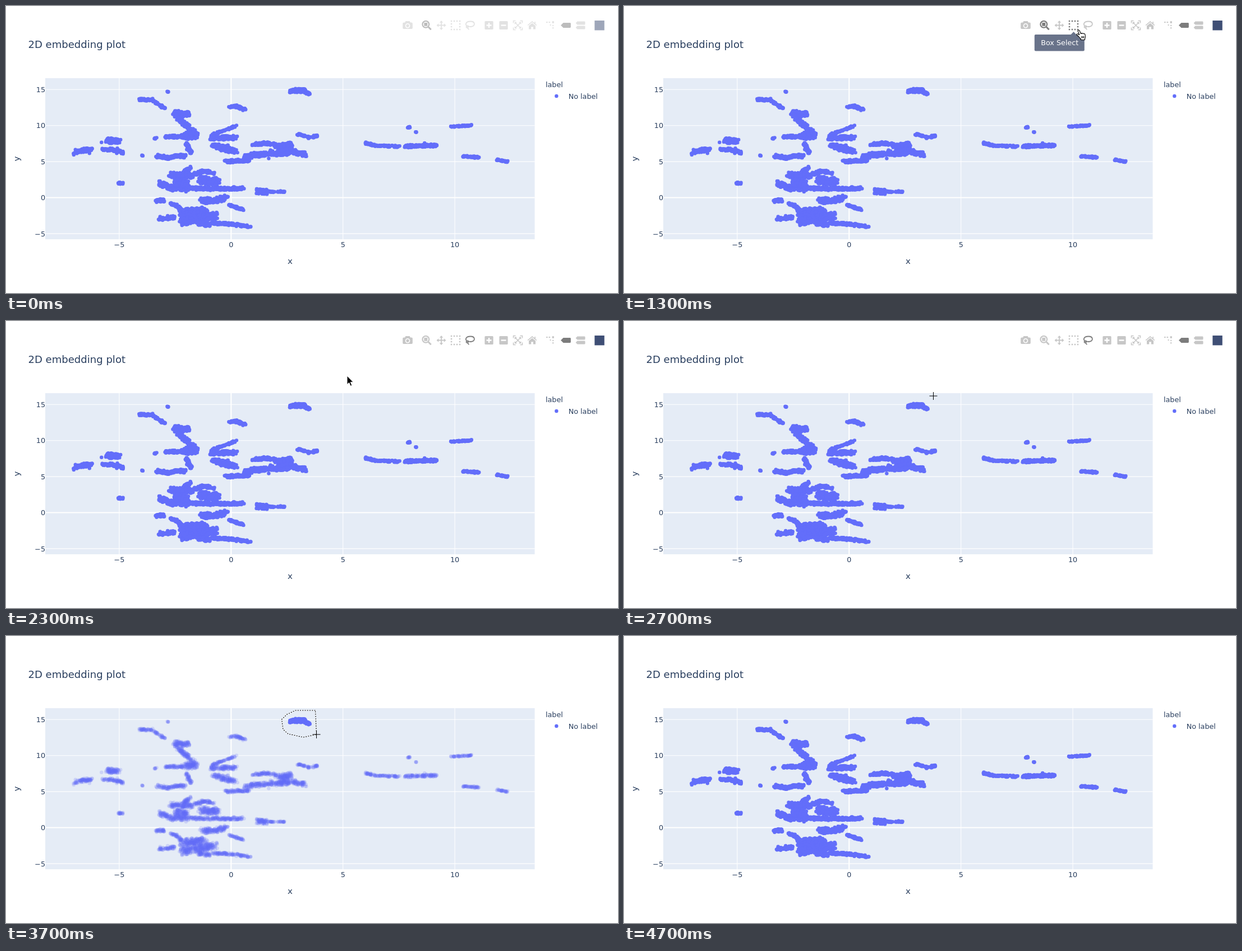
An HTML page for the animation above (5270 ms loop, 1091 by 513 pixels).

```html
<!DOCTYPE html>
<html lang="en">
<head>
<meta charset="utf-8">
<title>2D embedding plot</title>
<style>
html, body { margin: 0; height: 100%; overflow: hidden; background: #fff; }
svg { display: block; width: 100vw; height: 100vh; }
text { font: 12.75px "DejaVu Sans", Verdana, sans-serif; fill: #2a3f5f; }
.title { font-size: 18.06px; }
.axis { font-size: 14.9px; }
.mid { text-anchor: middle; }
.end { text-anchor: end; }
.icon { color: #c7c7c7; fill: currentColor; }
.icon.on { color: #7c7c7c; }
.line { fill: none; stroke: currentColor; }
.cut { fill: none; stroke: #fff; }
</style>
</head>
<body>
<svg id="stage" viewBox="0 0 1091 513">
  <rect x="70" y="129" width="872.5" height="288" fill="#e5ecf6"/>
  <g id="grid" stroke="#fff"></g>
  <g id="dots" fill="#636efa"></g>
  <g id="picked" fill="#636efa"></g>

  <text class="title" x="39.5" y="75">2D embedding plot</text>
  <g id="ticks"></g>
  <text class="axis mid" x="506.3" y="460.5">x</text>
  <text class="axis mid" transform="translate(24 273) rotate(-90)">y</text>
  <text x="962" y="145.3">label</text>
  <text x="1002.7" y="165.8">No label</text>
  <circle cx="981.3" cy="161" r="3.2" fill="#636efa"/>

  <g id="bar">
    <g class="icon" transform="translate(716 34.5)">
      <path d="M-7-5h2l1.5-2.5h7L5-5h2q1.8 0 1.8 1.8v8q0 1.8-1.8 1.8h-14q-1.8 0-1.8-1.8v-8q0-1.8 1.8-1.8z"/>
      <circle class="cut" cy=".8" r="3.5" stroke-width="1.6"/>
    </g>
    <g class="icon" id="zoom" transform="translate(750 34.5)">
      <circle class="line" cx="-1.7" cy="-1.7" r="5.9" stroke-width="2.2"/>
      <rect x="-4.7" y="-4.7" width="6" height="6"/>
      <path class="line" d="M3 3l4.7 4.7" stroke-width="3"/>
    </g>
    <g class="icon" transform="translate(776 34.5)">
      <path class="line" d="M-6 0H6M0-6V6" stroke-width="1.8"/>
      <path d="M0-8.5l3.2 3.7h-6.4zM0 8.5l3.2-3.7h-6.4zM-8.5 0l3.7 3.2v-6.4zM8.5 0l-3.7 3.2v-6.4z"/>
    </g>
    <g class="icon" id="box" transform="translate(801.5 34.5)">
      <rect class="line" x="-7.5" y="-7.5" width="15" height="15" stroke-width="2.5" stroke-dasharray="2.5" stroke-dashoffset="1.25"/>
    </g>
    <g class="icon" id="loop" transform="translate(827 34.5)">
      <path class="line" d="M-4.5 2C-9-1-8-7 1-7C10-7 10 2 2 2.5C-1 2.7-3 1.5-5 1.5C-8 2-6 5.5-3.5 4C-2 2.5-3-.5-5 1.5M-4 4.3Q-4 6-1.5 7.5" stroke-width="1.8"/>
    </g>
    <g class="icon" transform="translate(861 34.5)">
      <rect x="-7.6" y="-7.6" width="15.2" height="15.2" rx="1.5"/>
      <path class="cut" d="M-4.5 0h9M0-4.5v9" stroke-width="2.4"/>
    </g>
    <g class="icon" transform="translate(887 34.5)">
      <rect x="-7.6" y="-7.6" width="15.2" height="15.2" rx="1.5"/>
      <path class="cut" d="M-4.5 0h9" stroke-width="2.4"/>
    </g>
    <g class="icon" transform="translate(912.5 34.5)">
      <path class="line" d="M-8-4v-4h4M4-8h4v4M8 4v4h-4M-4 8h-4v-4M-4.5-4.5l9 9M4.5-4.5l-9 9" stroke-width="1.5"/>
      <path d="M-5.8-5.8h4.3l-4.3 4.3zM5.8-5.8v4.3l-4.3-4.3zM5.8 5.8h-4.3l4.3-4.3zM-5.8 5.8v-4.3l4.3 4.3z"/>
    </g>
    <g class="icon" transform="translate(938 34.5)">
      <path d="M0-4L6 1v6H1.8V2.8h-3.6V7H-6V1z"/>
      <path class="line" d="M-7.8 0L0-6.5L7.8 0M5-6.5v4" stroke-width="1.6"/>
    </g>
    <g class="icon" transform="translate(970 34.5)">
      <path d="M-7-6.5h2.6v2H-7zM-2.5-6.5H.1v2h-2.6zM3.5-7.2h3.4v3.4H3.5zM4.2-.8h2v2.4h-2zM4.2 3.6h2V6h-2zM-.4-1.5h2v2h-2z"/>
    </g>
    <g class="icon on" transform="translate(998 34.5)"><path d="M-9 0l4.5-4.5H7.4q1.4 0 1.4 1.4v6.2q0 1.4-1.4 1.4H-4.5z"/></g>
    <g class="icon" transform="translate(1024 34.5)">
      <path d="M-8.5-4l3-3H7.5l1 1v4l-1 1h-13zM-8.5 4l3-3H7.5l1 1v4l-1 1h-13z"/>
    </g>
    <rect x="1049.3" y="26" width="17.4" height="17.4" fill="#3f4f75"/>
  </g>

  <g id="tip">
    <path d="M-5.3 51.5L0 46l5.3 5.5z" fill="#69738a"/>
    <rect id="tipBox" y="51" height="29.5" rx="2.1" fill="#69738a"/>
    <text id="tipText" class="end" x="8.8" y="70.3" style="fill:#fff"></text>
  </g>

  <g fill="#fff" fill-opacity="0" stroke-width="1.06">
    <path id="lasso" stroke="#fff"/>
    <path id="dash" stroke="#000" stroke-dasharray="2.12"/>
  </g>

  <g id="cursor">
    <path id="arrow" d="M0 0V15.5L3.6 12.2L6.2 18.2L8.7 17.1L6.2 11.3H11z" stroke="#fff" stroke-width="1"/>
    <path id="hand" d="M-2 1.5Q-1.5-1 .8 .6L3.5 6.5Q4.5 4.8 6 6.3Q7.5 5 8.6 6.7Q10.5 6 11 8.2L11.5 12Q11.5 14 10.5 15.5V17.5H3.5V16Q1.5 14-.5 11.5L-4 8.5Q-4.5 6.5-2.3 6.8L.8 8.5zM4.8 11v3.5M6.8 11v3.5M8.8 11v3.5" fill="#fff" stroke="#000" stroke-width="1.1" stroke-linejoin="round"/>
    <path id="cross" d="M-7 0H7M0-7V7" stroke="#000" stroke-width="1"/>
  </g>
</svg>
<script>
const $ = id => document.getElementById(id);
const show = (el, on) => el.style.display = on ? '' : 'none';
const clamp = v => Math.max(0, Math.min(1, v));

function add(parent, tag, attrs, text = '') {
  const el = document.createElementNS('http://www.w3.org/2000/svg', tag);
  for (const k in attrs) el.setAttribute(k, attrs[k]);
  el.textContent = text;
  parent.append(el);
  return el;
}

// Grid and tick labels, every 5 units
const px = v => 401.3 + 39.88 * v, py = v => 342.5 - 12.88 * v;
for (let v = -5; v <= 15; v += 5) {
  const name = String(v).replace('-', '−'), width = v ? 1.06 : 2.12;
  add($('grid'), 'path', { d: `M70 ${py(v)}h872.5`, 'stroke-width': width });
  add($('ticks'), 'text', { class: 'end', x: 70, y: py(v) + 4.6 }, name);
  if (v > 10) continue;
  add($('grid'), 'path', { d: `M${px(v)} 129v288`, 'stroke-width': width });
  add($('ticks'), 'text', { class: 'mid', x: px(v), y: 431 }, name);
}

let seed = 11;
const rnd = () => (seed = (seed * 16807) % 2147483647) / 2147483647;

// Scatters dots around a polyline, dense in the middle, with a few strays
let layer = $('dots');
function swarm(radius, line) {
  const spine = add($('stage'), 'path', { d: 'M' + line });
  const length = spine.getTotalLength();
  const n = (length + 2 * radius) * (radius + 2) * .4;
  for (let i = 0; i < n; i++) {
    const p = spine.getPointAtLength(rnd() * length);
    const a = rnd() * 2 * Math.PI;
    const r = radius * rnd() ** .6 * (rnd() < .02 ? 2 : 1);
    add(layer, 'circle', { cx: p.x + r * Math.cos(a), cy: p.y + r * Math.sin(a), r: 3.2 });
  }
  spine.remove();
}

// far left
swarm(3.6, '122 263 134 258 153 257');
swarm(2.7, '171 256 190 257 209 262');
swarm(5, '179 240 202 242');
swarm(2, '200 317 208 317');
swarm(1, '242 267 244 267');
swarm(1, '265 237 268 236');
swarm(1, '288 153 290 153');
// upper left arm
swarm(2, '237 167 259 168 284 183');
swarm(5, '299 191 326 194');
swarm(4.5, '303 197 314 206 332 224');
swarm(6.8, '318 233 340 230');
swarm(2.8, '284 234 316 233');
swarm(3.2, '321 246 330 262');
swarm(3.2, '268 268 290 271 318 267');
// centre
swarm(1.8, '368 230 388 223 410 214');
swarm(4, '364 236 411 235');
swarm(5.2, '371 248 388 255 409 259');
swarm(3, '391 278 433 276');
swarm(4.7, '424 271 445 266 515 261 535 266');
swarm(2.8, '441 248 461 245 481 248');
swarm(7, '486 254 508 249');
swarm(2, '520 229 540 235 556 232');
swarm(2.4, '399 181 411 179 426 186');
// right
swarm(1.8, '641 245 662 250 703 251');
swarm(2.6, '709 251 767 249');
swarm(1.4, '716 217 720 217');
swarm(1, '730 226 731 226');
swarm(1.3, '792 216 831 213');
swarm(1.8, '814 268 843 271');
swarm(1.6, '875 275 894 278');
swarm(4.5, '447 331 465 332');
swarm(1, '465 332 497 332');
// lower block
swarm(3.5, '328 289 316 299');
swarm(5, '292 302 332 303');
swarm(3, '336 300 354 295 372 300');
swarm(4.8, '274 317 296 326 327 325');
swarm(6.5, '302 315 322 317');
swarm(7, '347 311 378 314');
swarm(3, '330 326 387 327 422 326');
swarm(3, '268 348 283 347');
swarm(5.2, '349 348 374 347 394 342');
swarm(2.4, '291 352 304 357 314 366');
swarm(7.5, '313 370 354 366');
swarm(7.5, '312 385 350 379 374 375');
swarm(2.6, '273 381 302 378');
swarm(3.4, '342 388 364 392');
swarm(2, '398 356 423 364');
swarm(2.4, '368 388 405 390 436 395');

layer = $('picked');
swarm(3, '506 152 530 151 540 157');
swarm(3.8, '515 151 530 151');

// Cursor stops (time, x, y), then the corners of the lasso
const stops = [
  [100, 136, 344], [600, 804, 85], [1000, 823, 39], [1100, 823, 39], [1300, 811, 43],
  [1500, 811, 43], [1800, 826, 41], [2200, 826, 41], [2300, 608, 98], [2700, 551.5, 134]
];
const corners = [
  [551.5, 133], [516, 133], [501, 140], [491.5, 149], [494, 167],
  [503, 175], [530, 181], [553.5, 176], [558, 154]
];
const DRAG = 2700, PER_CORNER = 1000 / 7, DROP = 4000;

const mix = (a, b, u) => a.map((v, i) => v + (b[i] - v) * u);

// The part of the lasso drawn so far, ending at the cursor
function trail(t) {
  const s = Math.min((t - DRAG) / PER_CORNER, corners.length - 1), i = Math.floor(s);
  return [...corners.slice(0, i + 1), mix(corners[i], corners[i + 1] || corners[i], s - i)];
}

function cursorAt(t) {
  if (t >= DROP) return mix(corners.at(-1), [700, 60], clamp((t - DROP) / 300));
  if (t > DRAG) return trail(t).at(-1);
  const i = Math.max(1, stops.findIndex(s => s[0] >= t));
  const [a, b] = [stops[i - 1], stops[i]];
  const u = clamp((t - a[0]) / (b[0] - a[0]));
  return mix(a, b, u * (2 - u)).slice(1);
}

function barOpacity(t) {
  if (t <= DRAG) return clamp(.5 + t / 400);
  return clamp(Math.min(t - DROP, 4700 - t) / 300);
}

function draw(t) {
  const [x, y] = cursorAt(t);
  const visible = t >= 100 && t < 4500;
  const overBar = visible && t < DRAG && y < 46;
  show($('cursor'), visible);
  $('cursor').setAttribute('transform', `translate(${x} ${y})`);
  show($('hand'), overBar);
  show($('arrow'), !overBar && y < 128);
  show($('cross'), y >= 128);

  const onBox = overBar && x < 814.2;
  const lassoMode = t >= 1900;
  $('bar').style.opacity = barOpacity(t);
  $('zoom').classList.toggle('on', !lassoMode);
  $('box').classList.toggle('on', onBox);
  $('loop').classList.toggle('on', lassoMode || overBar && !onBox);

  const w = onBox ? 89 : 101;
  show($('tip'), overBar);
  $('tip').setAttribute('transform', `translate(${onBox ? 801.5 : 827.3} 0)`);
  $('tipBox').setAttribute('x', 19.3 - w);
  $('tipBox').setAttribute('width', w);
  $('tipText').textContent = onBox ? 'Box Select' : 'Lasso Select';

  const selecting = t > DRAG && t < 4500;
  const d = selecting ? `M${trail(t).join('L')}Z` : '';
  $('lasso').setAttribute('d', d);
  $('dash').setAttribute('d', d);
  $('dots').setAttribute('fill-opacity', selecting ? .2 : 1);
  const p = $('stage').createSVGPoint();
  for (const c of $('picked').children) {
    p.x = c.cx.baseVal.value;
    p.y = c.cy.baseVal.value;
    c.setAttribute('fill-opacity', selecting && !$('lasso').isPointInFill(p) ? .2 : 1);
  }
}

let last = -1;
const start = performance.now();
function tick() {
  const t = Math.floor((performance.now() - start) % 5270 / 100) * 100;
  if (t !== last) draw(last = t);
  requestAnimationFrame(tick);
}
tick();
</script>
</body>
</html>
```
